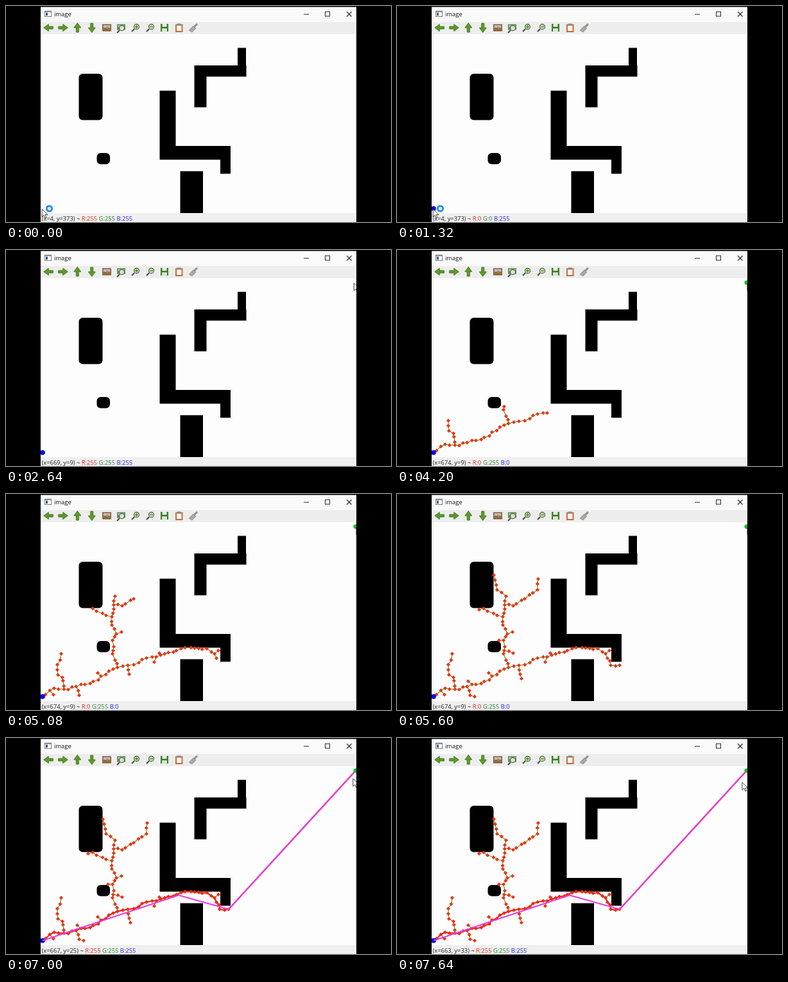
Write an HTML page with a canvas that moves like this. It is 600 px wide and 338 px high and loops after 7.68 s.

```html
<!DOCTYPE html>
<html>
<head>
<meta charset="utf-8">
<style>
html, body { margin: 0; height: 100%; overflow: hidden; background: #000; }
canvas { display: block; }
</style>
</head>
<body>
<canvas id="stage" width="600" height="338"></canvas>
<script>
const ctx = document.getElementById('stage').getContext('2d');
const LOOP = 7680;
const START_AT = 760, GOAL_AT = 2960, GROW_AT = 3546, PATH_AT = 5640, SMOOTH_AT = 6600;
const NODE_MS = 18, STEP = 7.3;
const START = [57, 317], GOAL = [545, 51], CORNER = [347, 268];
const FONT = '9.4px "Open Sans", "Noto Sans", sans-serif';

// ---- drawing helpers
function box(x, y, w, h, color) {
  ctx.fillStyle = color;
  ctx.fillRect(x, y, w, h);
}
function disc(x, y, r, color) {
  ctx.fillStyle = color;
  ctx.beginPath();
  ctx.arc(x, y, r, 0, 7);
  ctx.fill();
}
function ring(x, y, r, width, color) {
  ctx.strokeStyle = color;
  ctx.lineWidth = width;
  ctx.beginPath();
  ctx.arc(x, y, r, 0, 7);
  ctx.stroke();
}
function line(points, width, color) {
  ctx.strokeStyle = color;
  ctx.lineWidth = width;
  ctx.beginPath();
  points.forEach(p => ctx.lineTo(...p));
  ctx.stroke();
}
function shape(path, x, y, fill, stroke, width = 1, angle = 0) {
  ctx.save();
  ctx.translate(x, y);
  ctx.rotate(angle);
  ctx.fillStyle = fill;
  ctx.fill(path);
  if (stroke) {
    ctx.strokeStyle = stroke;
    ctx.lineWidth = width;
    ctx.stroke(path);
  }
  ctx.restore();
}
function text(str, x, y, color) {
  ctx.font = FONT;
  ctx.fillStyle = color;
  ctx.fillText(str, x, y);
  return x + ctx.measureText(str).width;
}

const ARROW = new Path2D('M-7-2H0V-5.5L7.5 0L0 5.5V2H-7Z');
const POINTER = new Path2D('M0 0V12L3 9.4L5 14L7 13L5 8.8H9Z');
const DIAMOND = new Path2D('M0-3.1L3.1 0L0 3.1L-3.1 0Z');
const BRUSH = new Path2D('M0-3L4 1L-2 7L-7 4Z');

const walls = new Path2D();
walls.roundRect(113.5, 106, 37, 72.5, 6);
walls.roundRect(141.5, 230, 20.5, 17.5, 6);
walls.rect(239.5, 132.5, 25, 108);
walls.rect(239.5, 219, 110.5, 21.5);
walls.rect(334, 219, 16, 43.5);
walls.rect(271.5, 258.5, 35.5, 66);
walls.rect(293.5, 93, 81, 17.5);
walls.rect(293.5, 93, 19, 65.5);
walls.rect(361, 65.5, 13, 45);

// ---- search tree: the nearest node steps towards each target, one node at a time
let seed = 7;
function jitter() {
  seed = seed * 16807 % 2147483647;
  return (seed / 2147483647 - 0.5) * 3;
}
const tree = [{ pos: START, at: GROW_AT }];
function reach(x, y) {
  const far = n => Math.hypot(x - n.pos[0], y - n.pos[1]);
  let node = tree.reduce((a, b) => far(b) < far(a) ? b : a);
  const [x0, y0] = node.pos;
  const steps = Math.max(1, Math.round(far(node) / STEP));
  for (let i = 1; i <= steps; i++) {
    const u = i / steps, wobble = i < steps ? 1 : 0;
    const pos = [x0 + (x - x0) * u + jitter() * wobble, y0 + (y - y0) * u + jitter() * wobble];
    node = { pos, parent: node, at: GROW_AT + tree.length * NODE_MS };
    tree.push(node);
  }
  return node;
}
const branch = (...targets) => targets.forEach(p => reach(...p));

// first stretch with two shoots
branch([75, 304], [97, 306], [103, 302], [123, 298], [144, 291], [148, 285], [167, 274],
  [190, 268], [207, 264], [212, 259], [234, 255]);
branch([88, 287], [81, 283], [80, 267]);
branch([170, 260], [166, 250], [168, 239]);
// below the wall, then the fork on the left
branch([273, 242], [294, 241], [313, 242], [325, 250], [328, 257]);
branch([166, 229], [172, 219], [165, 205], [165, 192], [135, 179]);
branch([168, 180], [170, 160], [181, 175], [199, 164]);
// twigs
branch([86, 250], [74, 314], [114, 315], [143, 280], [192, 282], [231, 263], [239, 249],
  [331, 245], [180, 216], [159, 229]);
// last shoots and the way round the corner
branch([181, 249], [128, 181], [156, 150], [151, 127], [219, 150], [220, 133]);
branch([111, 293], [121, 317], [194, 289], [333, 268]);

const route = [GOAL];
for (let n = reach(...CORNER); n; n = n.parent) route.push(n.pos);
const shortcut = [START, [269, 246], CORNER, GOAL];

// ---- mouse position in picture coordinates
function ease(t, from, to) {
  const u = Math.min(1, Math.max(0, (t - from) / (to - from)));
  return u * u * (3 - 2 * u);
}
function mouse(t) {
  const cross = ease(t, 1700, 2360), nudge = ease(t, 2800, 2920), leave = ease(t, 6760, 7160);
  return [4 + 665 * cross + 5 * nudge - 11 * leave, 373 - 364 * cross + 24 * leave].map(Math.round);
}

function colorUnder(t, mx, my, x, y) {
  if (mx === 4 && my === 373 && t >= START_AT) return [0, 0, 255];
  if (mx === 674 && my === 9 && t >= GOAL_AT) {
    if (t >= SMOOTH_AT) return [255, 0, 255];
    return t >= PATH_AT ? [255, 0, 0] : [0, 255, 0];
  }
  return ctx.isPointInPath(walls, x, y) ? [0, 0, 0] : [255, 255, 255];
}

// ---- window parts
function picture(x, y, w, h, frame) {
  box(x - w / 2, y - h / 2, w, h, frame);
  box(x - w / 2 + 1.5, y - h / 2 + 1.5, w - 3, h - 3, '#a9c4d4');
  box(x - w / 2 + 1.5, y, w - 3, h / 2 - 1.5, '#7c7440');
  disc(x + 1, y, 2, '#cf8040');
}
function lens(x, y, sign) {
  line([[x - 2, y + 2], [x - 6, y + 6]], 2.3, '#50524a');
  disc(x + 1.5, y - 1.5, 4, '#d5e8c6');
  ring(x + 1.5, y - 1.5, 4, 1.3, '#556b4a');
  if (!sign) return;
  box(x - 1, y - 2.3, 5, 1.6, '#4c9420');
  if (sign > 0) box(x + 0.7, y - 4, 1.6, 5, '#4c9420');
}
function titleBar() {
  box(54, 1.5, 492, 23.5, '#fafafa');
  box(60, 7.5, 11, 9.5, '#707880');
  box(61, 9.5, 9, 6.5, '#fff');
  box(62, 10.5, 3, 4.5, '#405878');
  text('image', 75, 16, '#111');
  line([[464, 13], [472, 13]], 1, '#222');
  ctx.strokeRect(497.5, 9, 7, 7);
  line([[531, 9], [538.5, 16.5]], 1.1, '#222');
  line([[538.5, 9], [531, 16.5]], 1.1, '#222');
}
function toolBar() {
  box(54, 25, 492, 19, '#ededed');
  [2, 0, 3, 1].forEach((turn, i) =>
    shape(ARROW, 66.3 + 22.5 * i, 34, '#5c9a28', '#3f7519', 0.9, turn * Math.PI / 2));
  picture(157, 34, 14, 11, '#94502c');
  picture(179.5, 33, 13, 9, '#5d8a58');
  lens(179, 36, 0);
  lens(202, 34, 1);
  lens(225, 34, -1);

  box(241, 28, 12, 12, '#3d7d26');
  box(243.5, 28, 7, 4.5, '#e4eee0');
  box(243, 35, 8, 5, '#d5e5cf');
  box(264, 28.5, 11.5, 12.5, '#c66b35');
  box(266, 30.5, 7.5, 8.5, '#fbf7f2');
  box(267, 27.5, 5.5, 3, '#888');
  line([[298, 28], [292, 34]], 3, '#8e8e8e');
  shape(BRUSH, 292, 34, '#a8a8a4', '#858580', 0.7);
}
function status(mx, my, rgb) {
  box(54, 324, 492, 14, '#efefef');
  let x = text(`(x=${mx}, y=${my}) ~ `, 55.5, 336, '#222');
  ['#e32b1c', '#23852d', '#2020d8'].forEach((color, i) => {
    x = text('RGB'[i] + ':' + rgb[i] + ' ', x, 336, color);
  });
}

function draw(t) {
  const [mx, my] = mouse(t);
  const px = 53.2 + mx * 0.731, py = 45.2 + my * 0.731;
  box(0, 0, 600, 338, '#000');
  ctx.save();
  ctx.beginPath();
  ctx.rect(54, 1, 492, 337);
  ctx.clip();
  box(54, 44, 492, 280, '#fdfdfd');
  titleBar();
  toolBar();
  ctx.fillStyle = '#000';
  ctx.fill(walls);

  const grown = tree.filter(n => n.parent && n.at <= t);
  grown.forEach(n => shape(DIAMOND, ...n.pos, '#ee3116'));
  grown.forEach(n => line([n.parent.pos, n.pos], 1.2, '#7c8a28'));
  grown.forEach(n => disc(...n.pos, 1.7, '#ee3116'));
  ctx.lineJoin = 'round';
  if (t >= PATH_AT) line(route, 2.2, '#ea2812');
  if (t >= START_AT) disc(...START, 3.8, '#0505f0');
  if (t >= SMOOTH_AT) line(shortcut, 2.2, '#e63ddf');
  if (t >= GOAL_AT) disc(...GOAL, 3.6, '#12c21c');

  status(mx, my, colorUnder(t, mx, my, px, py));
  ctx.lineJoin = 'miter';
  shape(POINTER, px, py, '#fff', '#333', 0.9);
  if (t < 1660) {
    disc(67.5, 317, 5.5, '#d8ecfa');
    ring(67.5, 317, 4.2, 2.7, '#2388e0');
  }
  ctx.restore();
}

const began = performance.now();
function frame() {
  draw((performance.now() - began) % LOOP);
  requestAnimationFrame(frame);
}
frame();
</script>
</body>
</html>
```
